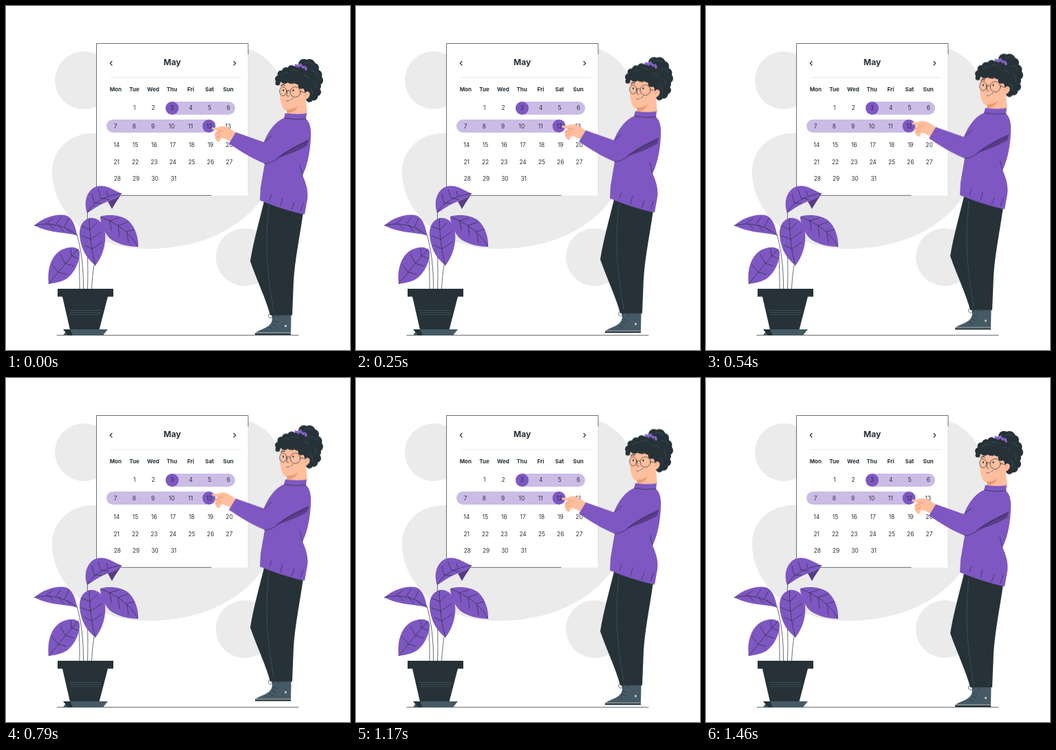
Recreate the animation shown at these times as an HTML page. Size 500 by 500 pixels, loop 1500 ms.

```html
<!DOCTYPE html>
<html lang="en">
<head>
<meta charset="utf-8">
<title>Calendar</title>
<style>
html, body { margin: 0; width: 100%; height: 100%; overflow: hidden; background: #fff; }
svg { display: block; width: 100%; height: 100%; }
text { font-family: Inter, "Open Sans", sans-serif; font-size: 8.3px; fill: #263238; text-anchor: middle; }
.head text { font-weight: 700; font-size: 8px; }
.head .month { font-size: 12px; }
.dark { fill: #263238; }
.purple { fill: #7e57c2; }
.shade { fill: #573c87; }
.skin { fill: #ffbe9d; }
.grey { fill: #ebebeb; }
.pill { fill: #cbbce5; }
.line { fill: none; stroke: #263238; stroke-width: .7; stroke-linecap: round; stroke-linejoin: round; }
.soft { fill: none; stroke: #455a64; stroke-width: .7; stroke-linecap: round; }
.woman { animation: bob 1500ms -40ms infinite; }
@keyframes bob {
  0%, 100% { transform: translateY(0); animation-timing-function: cubic-bezier(.37, 0, .63, 1); }
  50% { transform: translateY(-8.6px); animation-timing-function: cubic-bezier(.37, 0, .63, 1); }
}
</style>
</head>
<body>
<svg viewBox="0 0 500 500">
  <g class="grey">
    <circle cx="113" cy="108" r="42"/>
    <circle cx="347" cy="365" r="42"/>
    <path d="M131 185C91 183 66 211 67 243C69 302 125 353 205 353C275 353 336 329 372 280C402 240 413 175 403 122C396 88 374 68 350 62L250 100Z"/>
  </g>

  <g class="calendar">
    <path fill="#fff" d="M131.500 54.500H352V275.500H131.500Z"/>
    <path class="line" d="M298 275.300H131.500V54.500H352V70"/>
    <path fill="none" stroke="#d5d5d5" stroke-width=".6" d="M352 70V275M152 104H342"/>
    <path class="line" style="stroke-width:1.200" d="M154 80.500L151.200 83.200L154 86M331 80.500L333.800 83.200L331 86"/>
    <rect class="pill" x="232" y="139" width="101" height="19" rx="9.500"/>
    <rect class="pill" x="146" y="165" width="158" height="19" rx="9.500"/>
    <circle class="purple" cx="241.500" cy="148.500" r="9.500"/>
    <circle class="purple" cx="295" cy="174.500" r="9.500"/>
    <g class="head" id="head"><text class="month" x="241.700" y="86.300">May</text></g>
    <g id="days"></g>
  </g>

  <path class="line" d="M74 478.500H425"/>

  <g class="plant">
    <path class="soft" style="stroke:#263238" d="M103 332C109 352 113 380 112.500 412M118.500 300C117 340 120 375 118.500 412M128 376C126 390 125 400 124.500 412M105 354C107 375 107 395 107 412"/>
    <path class="purple" d="M118 301C111 281 121 262 137 261.500C149 261 158 269 168 272.500C161 281 154 281 148 284C137 288 127 295 118 301Z"/>
    <path class="shade" d="M168 272.500C161 281 154 281 148 284L154 295C158 287 164 280 168 272.500Z"/>
    <path class="purple" d="M41 319C56 306 76 301 88 304.500C98 309 101 322 103.500 333.500C89 329 66 331 41 319Z"/>
    <path class="purple" d="M137 306C150 302 168 304 178 312C188 321 193 338 192 350C178 350 160 346 150 337C142 328 137 316 137 306Z"/>
    <path class="purple" d="M122 308C111 311 106 321 107 334C109 355 119 369 130 377C140 365 146 345 144 330C142 315 134 307 122 308Z"/>
    <path class="purple" d="M62 404C60 385 64 366 78 356C88 350 103 348 107 357C108 370 100 386 92 393C85 400 75 402 62 404Z"/>
    <g class="line">
      <path d="M118.500 300C127 284 147 275 168 272.500M128 286L125 273M138 279L134 267M148 276L146 269M128 286L139 287M139 279L149 281"/>
      <path d="M41 319C62 314 85 318 103 333M58 316L68 309M73 317L80 307M85 321L91 309M62 316L69 324M76 318L83 327M88 323L94 329"/>
      <path d="M138 307C158 314 180 328 192 350M151 312L164 308M163 319L177 314M175 328L186 325M151 312L153 326M163 319L165 335M176 330L178 344"/>
      <path d="M121 309C122 334 124 357 130 377M122 325L132 315M123 339L139 328M125 353L140 343M122 325L110 320M123 339L110 334M125 353L114 348"/>
      <path d="M105 353C91 368 77 386 62 404M95 363L94 353M86 374L79 361M76 387L67 376M95 363L105 367M86 374L98 378M76 387L88 390"/>
    </g>
    <path class="dark" d="M75 411H156V422.500H148L135.500 470.500H93L82 422.500H75Z"/>
    <path class="soft" d="M92 442.500H139M93 445.500H138M94 448.500H137"/>
    <path fill="#455a64" d="M89 470H148L141 478.500H83Z"/>
    <path class="dark" d="M83 470H93L97 478.500H90Z"/>
  </g>

  <g class="woman">
    <path fill="#455a64" d="M386 447L414.500 449L414 475H362.500C370 469 386 468 387 455Z"/>
    <path class="dark" d="M362 475.300H414V478H362Z"/>
    <path class="soft" style="stroke:#d5dadd" d="M363 475H413.500"/>
    <path class="line" d="M388 457L394 460M386 462L392 465M383 467L388 470M388 451C383 445 380 448 382 452C385 456 390 451 388 449C393 444 398 448 396 452"/>
    <circle cx="406.500" cy="465" r="1.500" fill="#dfe3e6"/>
    <path class="dark" d="M376 280L432 300C427 335 420 368 418 400L416 449.500H384C379 429 366 402 355 371C360 340 369 310 376 280Z"/>
    <path class="soft" d="M382 291C378 330 378 365 382 395C384 415 387 430 389 444"/>

    <g class="skin">
      <path d="M334 184C326 178 320 174 312 175C307 177 303 177 300 176.500C298 178 299 179.500 302 180L308 181C304 183 303 185 303.500 189C304 193 306 197 309 197.500C312 197 311 194 313 192C318 192 321 194 326 197Z"/>
      <path d="M399 112L433 108L438 157H408.500L408 152C401 151 399 140 398 128Z"/>
    </g>
    <path fill="none" stroke="#e58f68" stroke-width=".8" stroke-linecap="round" d="M308 181L316 182M305 186L311 184M306 191L312 188"/>
    <path fill="#eb996f" d="M408 150.500C415 151 420 149 424 145C421 153 415 156 408.500 155Z"/>

    <g class="purple">
      <path d="M406 155.500Q421 158 437 156L436 164C442 169 444 180 443 191C442 217 436 237 431 246C436 257 440 270 438 281L434 303C410 298 388 290 369 282.500L370 264L376 229C358 222 341 211 324 200L334 183.500L375 198C380 184 391 168 404 163Z"/>
    </g>
    <path class="shade" d="M440 194.500C421 203 406 211 392 222C410 216 427 210 438 202.500Z"/>
    <g class="line" stroke-width=".6">
      <path d="M375 198L386 189M376 229C386 229 395 222 402 216C415 207 428 201 440 195"/>
      <path d="M405 163Q420 166 436 164M431 246L427 231M383 282L386 274M399 290L402 279M415 296L419 286M428 298L432 287"/>
    </g>

    <g class="dark" id="hair"></g>
    <path class="dark" d="M396 106C404 91 422 86 438 94L454 98L452 130L439 139L433 121C429 118 426 114 425 109C415 112 404 108 396 112Z"/>
    <path class="skin" d="M433 130C434 124 440 122 441.500 127C442 133 437 137 433 135Z"/>
    <path fill="none" stroke="#e58f68" stroke-width=".7" d="M435 131Q436 127 439 127"/>
    <path class="soft" d="M402 100q4-6 9-3M415 94q6-3 10 2M432 101q7-1 9 5M447 109q5 4 3 9M442 119q5 4 3 10M434 84q6-5 12 1M444 94q7 0 9 6"/>
    <path fill="none" stroke="#8f68d3" stroke-width="3.500" stroke-linecap="round" stroke-linejoin="round" d="M421 86L425 88L428 85L431 89L435 89L436 92"/>
    <path class="line" style="stroke-width:.5" d="M424 85L424 89M429 85L430 90M434 88L434 92"/>

    <g class="line">
      <path d="M400 116Q402 113 405 115M416 113Q421 110 425 114" stroke-width="1.200"/>
      <path d="M409 123L408 130Q409 132 411 131"/>
      <path d="M408 138Q414 139 417 134"/>
      <path d="M407.500 124Q410 121 413 124M428 124L435 126"/>
      <ellipse cx="402.700" cy="124" rx="5" ry="6.500"/>
      <circle cx="420.500" cy="125" r="7.500"/>
    </g>
    <ellipse class="dark" cx="403" cy="122.500" rx="1" ry="1.500"/>
    <ellipse class="dark" cx="417.500" cy="122.500" rx="1" ry="1.500"/>
    <path fill="#fff" d="M410 138.300Q414 138.300 416 135.800Q415 140 410 138.300Z"/>
  </g>
</svg>
<script>
const byId = id => document.getElementById(id);
function add(parent, tag, attrs, content = "") {
  const el = document.createElementNS("http://www.w3.org/2000/svg", tag);
  for (const key in attrs) el.setAttribute(key, attrs[key]);
  el.textContent = content;
  byId(parent).append(el);
}

const step = 27.3;
["Mon", "Tue", "Wed", "Thu", "Fri", "Sat", "Sun"].forEach((name, i) =>
  add("head", "text", { x: 159.3 + i * step, y: 124.3 }, name));

// first day, last day, x of the first day, baseline
const weeks = [[1, 6, 186.8, 151], [7, 13, 159, 178], [14, 20, 160.7, 205], [21, 27, 160.7, 230], [28, 31, 161.8, 254]];
for (const [first, last, x, y] of weeks)
  for (let day = first; day <= last; day++)
    add("days", "text", { x: x + (day - first) * step, y }, day);

// x, y, radius of each curl
const curls = [
  [396, 106, 5], [395, 112, 3.5], [400, 99, 5.5], [407, 95, 6], [415, 92, 6], [424, 93, 7],
  [433, 85, 8], [441, 86, 9], [448, 90, 7], [440, 100, 13], [452, 100, 7.5], [454, 108, 7],
  [451, 116, 7], [452, 125, 6], [447, 131, 6.5], [441, 135, 5], [405, 107, 6], [414, 107, 6], [424, 108, 6], [429, 116, 4.5]
];
for (const [cx, cy, r] of curls) add("hair", "circle", { cx, cy, r });
</script>
</body>
</html>
```
